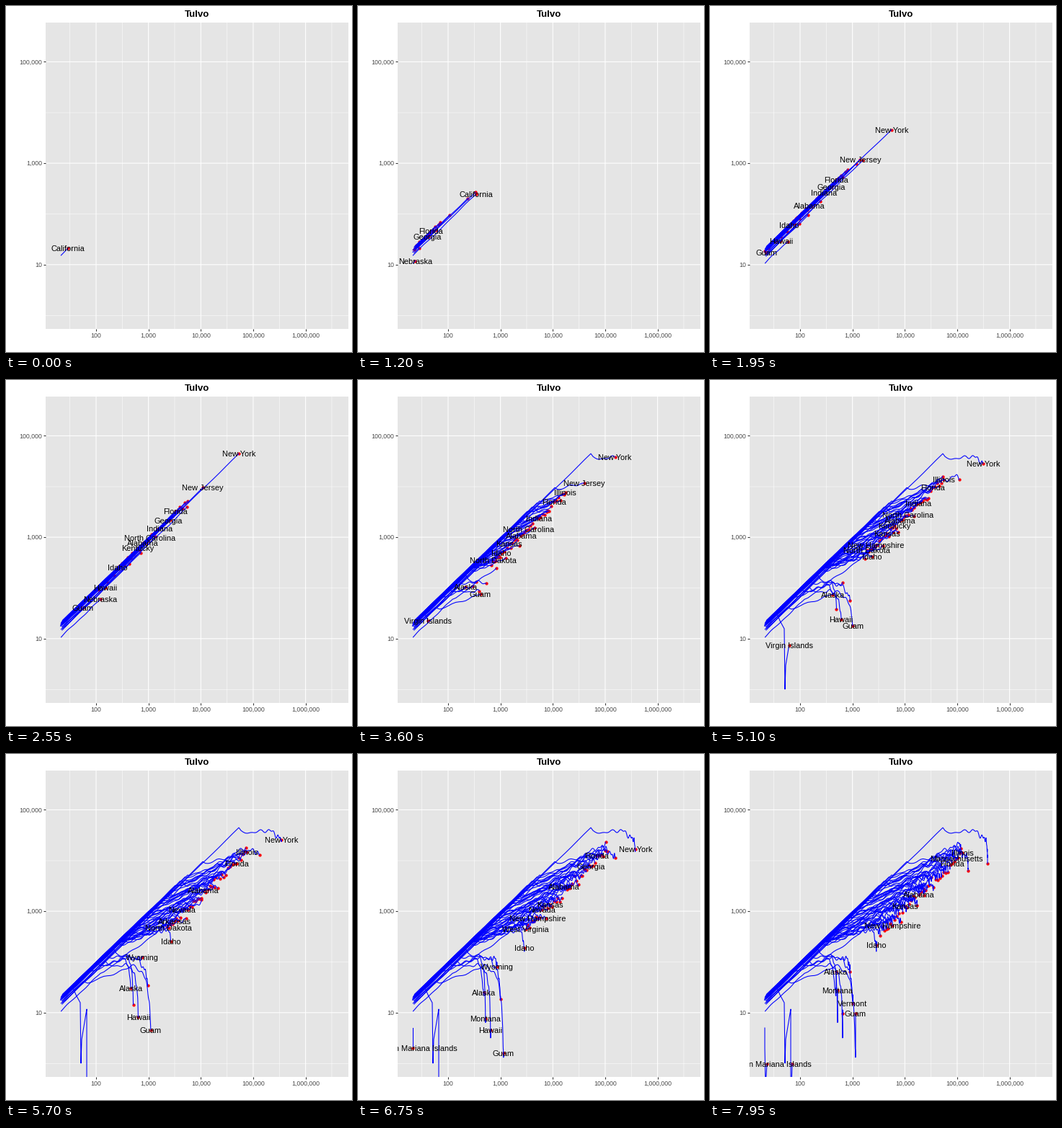
Animation of 480 by 480 pixels, one loop 8 s. Source, as a matplotlib script:

```python
import matplotlib.pyplot as plt
import numpy as np
from matplotlib.animation import FuncAnimation

PX = 0.9            # points per pixel at 80 dpi
BEND, LAST = 17, 53  # steps where growth slows and where the loop ends
LEFT, RIGHT, TOP, BOTTOM = 55, 474.5, 23, 448
DECADE_X, DECADE_Y = 72.65, 70.35
rng = np.random.default_rng(7)
plt.rcParams["font.family"] = "Liberation Sans"

BY_SIZE = """Illinois, Texas, Pennsylvania, Massachusetts, Michigan, Florida,
Connecticut, Louisiana, Georgia, Maryland, Virginia, Ohio, Indiana, Colorado,
Minnesota, Tennessee, Wisconsin, North Carolina, Iowa, Arizona, Rhode Island,
Alabama, Mississippi, Missouri, Kentucky, South Carolina, Delaware, Utah,
Kansas, New Mexico, District of Columbia, Oklahoma, Nevada, Puerto Rico,
New Hampshire, South Dakota, Arkansas, Oregon, Maine, North Dakota,
West Virginia"""

# Which labels find room, by step; earlier names win a collision.
LABELS = {
    0: "California",
    8: "California, Florida, Georgia, Massachusetts, Nebraska, New York, "
       "Pennsylvania",
    17: "Alabama, Florida, Georgia, Guam, Hawaii, Idaho, Indiana, Kentucky, "
        "Maine, Nebraska, New Jersey, New York, North Carolina",
    30: "Alabama, Alaska, Florida, Guam, Hawaii, Idaho, Illinois, Indiana, "
        "Kansas, Kentucky, Maryland, Massachusetts, New Hampshire, "
        "New Jersey, New York, North Carolina, North Dakota, Virgin Islands",
    38: "Alabama, Alaska, Arizona, Arkansas, Florida, Guam, Hawaii, Idaho, "
        "Illinois, Iowa, Maryland, Massachusetts, Nevada, New Mexico, "
        "New York, North Dakota, Vermont, Wyoming",
    45: "Alabama, Alaska, Florida, Georgia, Guam, Hawaii, Idaho, Illinois, "
        "Iowa, Kansas, Massachusetts, Montana, Nevada, New Hampshire, "
        "New York, Northern Mariana Islands, West Virginia, Wyoming",
    53: "Alabama, Alaska, Florida, Guam, Hawaii, Idaho, Illinois, Iowa, "
        "Kansas, Kentucky, Massachusetts, Montana, New Hampshire, "
        "Northern Mariana Islands, Oregon, Vermont, Wyoming, California",
}


def diagonal(x):
    """Pixel height of steady exponential growth at x."""
    return 337.5 - DECADE_Y / DECADE_X * (x - 74.5)


def half_steps(start):
    return np.arange(np.ceil(2 * start), 2 * LAST + 1) / 2


class Trace:
    def __init__(self, name, steps, x, y):
        self.steps, self.x, self.y = steps, x, y
        self.name = name
        self.line, = ax.plot([], [], color="blue", lw=1.07 * PX, zorder=3,
                             solid_joinstyle="round")
        self.text = ax.text(0, 0, name, size=11 * PX, ha="center",
                            va="baseline", clip_on=True, zorder=4)

    def show(self, step):
        n = np.searchsorted(self.steps, step, "right")
        self.line.set_data(self.x[:n], self.y[:n])
        self.text.set_visible(False)
        return (self.x[n - 1], self.y[n - 1]) if n else None


def outbreak(name, reach, end, depth=66, dip=0, brake=2.1, start=None,
             gap=None):
    """Climb the diagonal to reach, then brake towards end while sinking."""
    x0 = 75 + rng.uniform(0, 3)
    if start is None:
        start = BEND - 11.3 * ((reach - 75) / 175) ** 0.6
    if gap is None:
        gap = min(rng.exponential(3), 12)
    t = half_steps(start)
    climb = np.clip((t - start) / (BEND - start), 0, 1)
    settle = np.clip((t - BEND) / (LAST - BEND), 0, 1)
    x = (x0 + (reach - x0) * climb
         + (end - reach) * (1 - (1 - settle) ** brake))
    sink = depth * settle ** 0.65
    trough = dip * np.exp(-((t - 42) / 8) ** 2)
    phase = rng.uniform(0, 6.3, 3)
    wave = sum(np.sin(f * t + p) for f, p in zip((0.5, 1.1, 2), phase))
    wave *= 0.4 + 0.03 * np.minimum(sink, 60)
    return Trace(name, t, x,
                 diagonal(x) + np.maximum(gap + sink + trough + wave, 0))


def island(name, *points):
    """A tiny count that jumps between a few values."""
    times, xs, ys = np.array(points, float).T
    t = half_steps(times[0])
    return Trace(name, t, np.interp(t, times, xs), np.interp(t, times, ys))


fig = plt.figure(figsize=(6, 6), dpi=80, facecolor="white")
ax = fig.add_axes([LEFT / 480, 1 - BOTTOM / 480,
                   (RIGHT - LEFT) / 480, (BOTTOM - TOP) / 480])
ax.set(xlim=(LEFT, RIGHT), ylim=(BOTTOM, TOP), facecolor="#E5E5E5",
       xticks=[], yticks=[])
ax.set_autoscale_on(False)
for spine in ax.spines.values():
    spine.set_visible(False)


def tick(x, y, dx, dy):
    ax.plot([x, x + dx], [y, y + dy], color="#333333", lw=1.07 * PX,
            clip_on=False, solid_capstyle="butt")


def axis_text(x, y, text, ha):
    ax.text(x, y, text, size=8.8 * PX, color="#4D4D4D", ha=ha, va="baseline")


def grid(draw_line, position, width):
    draw_line(position, color="white", lw=width * PX, zorder=1, snap=False)


for k in range(6):
    grid(ax.axvline, 88.7 + DECADE_X * k, 0.53)
for k in range(3):
    grid(ax.axhline, 148 + 2 * DECADE_Y * k, 0.53)
for k in range(5):
    x = 125 + DECADE_X * k
    grid(ax.axvline, x, 1.07)
    tick(x, BOTTOM, 0, 2.8)
    axis_text(x, 460, f"{10 ** (k + 2):,}", "center")
for k in range(3):
    y = 358.8 - 2 * DECADE_Y * k
    grid(ax.axhline, y, 1.07)
    tick(LEFT, y, -2.8, 0)
    axis_text(50, y + 3.2, f"{10 ** (2 * k + 1):,}", "right")
ax.text(264.7, 15, "Tulvo", size=13.2 * PX, weight="bold", ha="center",
        va="baseline")

# Most places follow their rank; the rest stand out from the crowd.
traces = [outbreak(name.strip(), 252 - 3.6 * r + 0.03 * r * r, 350 - 2.85 * r,
                   depth=66 * rng.uniform(0.95, 1.05))
          for r, name in enumerate(BY_SIZE.replace("\n", " ").split(","))]
traces += [
    outbreak("New York", 323, 385, depth=107, brake=3.6, gap=6),
    outbreak("New Jersey", 273, 358, depth=92, brake=3),
    outbreak("California", 251, 348, depth=46, start=-1, gap=10),
    outbreak("Washington", 244, 297, start=0.5, gap=5),
    outbreak("Nebraska", 131, 297, depth=45, start=7.3, gap=21),
    outbreak("Idaho", 155, 231, depth=75, dip=20, brake=4),
    outbreak("Alaska", 114, 175, depth=52, dip=50, brake=4),
    outbreak("Hawaii", 138, 184, depth=105, dip=60, brake=5),
    outbreak("Montana", 140, 177, depth=72, dip=70, brake=5),
    outbreak("Vermont", 150, 198, depth=115, dip=20, brake=4),
    outbreak("Wyoming", 128, 194, depth=76, brake=3),
    outbreak("Guam", 107, 202, depth=125, dip=95, brake=5, gap=9),
    island("Virgin Islands", (13, 76, 340), (20, 92, 322), (24, 97, 334),
           (27, 103, 345), (28, 104, 429), (30, 105, 396), (36, 112, 354),
           (37, 112, 460), (45, 113, 460), (53, 114, 430)),
    island("Northern Mariana Islands", (41, 76, 380), (45, 76, 408),
           (49, 77, 460), (53, 79, 430)),
]

dots, = ax.plot([], [], "o", color="red", ms=4.3 * PX, mew=0, zorder=2)


def overlaps(box, others):
    x, y, width = box
    return any(abs(x - ox) < (width + ow) / 2 and abs(y - oy) < 6.5
               for ox, oy, ow in others)


def draw(tick_number):
    step = tick_number // 3  # each step lasts three ticks of 50 ms
    heads = {}
    for trace in traces:
        head = trace.show(step)
        if head:
            heads[trace] = head
    dots.set_data(*zip(*heads.values()))
    by_name = {trace.name: trace for trace in heads}
    placed = []
    for name in LABELS[min(LABELS, key=lambda s: abs(s - step))].split(", "):
        if name not in by_name:
            continue
        x, y = heads[by_name[name]]
        box = (x, y, 5.5 * len(name))
        if not overlaps(box, placed):
            placed.append(box)
            by_name[name].text.set_position((x, y + 4))
            by_name[name].text.set_visible(True)
    return []


anim = FuncAnimation(fig, draw, frames=160, interval=50, repeat=True,
                     repeat_delay=0, blit=False)
plt.show()
```
